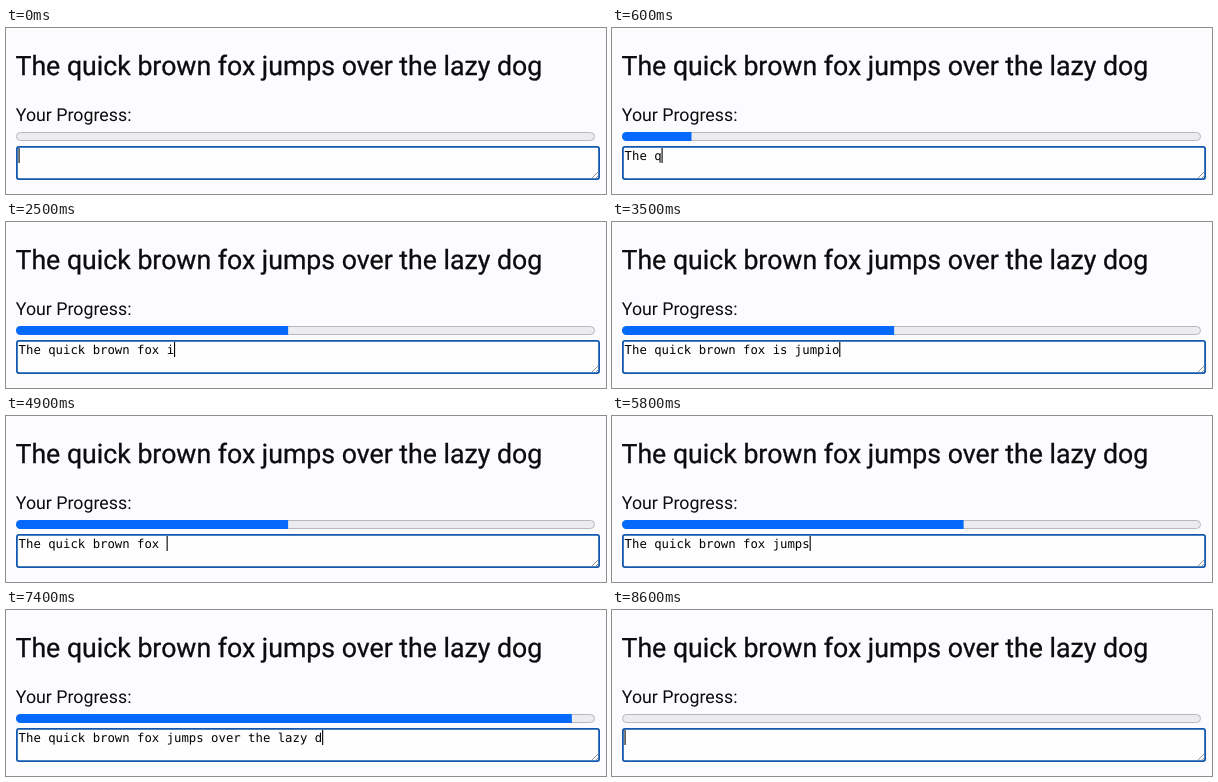
Write an HTML page that moves like this. It is 600 px wide and 166 px high and loops after 8700 ms.

```html
<!DOCTYPE html>
<html lang="en">
<head>
<meta charset="utf-8">
<title>Typing test</title>
<style>
  html, body { margin: 0; width: 100%; height: 100%; overflow: hidden; background: #fcfbfd; }
  svg { display: block; width: 600px; height: 166px; }
  text { font-family: Roboto, sans-serif; fill: #0c0c0e; white-space: pre; text-rendering: geometricPrecision; }
  .title { font-size: 26.7px; stroke: #0c0c0e; stroke-width: .3px; }
  .label { font-size: 17.8px; }
  #typed { font-family: "DejaVu Sans Mono", monospace; font-size: 12.3px; fill: #000; }
  .track { fill: #ececee; stroke: #b9b9bb; }
  #value { fill: #056afb; }
  .field { fill: #fefefe; stroke: #1259ae; stroke-width: 1.8px; }
  .grip { stroke: #8a8a8a; stroke-width: .9px; }
</style>
</head>
<body>
<svg viewBox="0 0 600 166">
  <clipPath id="pill"><rect x="10" y="104" width="579" height="9" rx="4.5"/></clipPath>
  <text class="title" x="9.5" y="47">The quick brown fox jumps over the lazy dog</text>
  <text class="label" x="9.8" y="93">Your Progress:</text>
  <rect class="track" x="10.5" y="104.5" width="578" height="8" rx="4"/>
  <rect id="value" x="10" y="104" width="0" height="9" clip-path="url(#pill)"/>
  <rect class="field" x="10.9" y="118.9" width="582.2" height="32.2" rx="2"/>
  <path class="grip" d="M586 150l6.5-6.5M590 150l2.5-2.5"/>
  <text id="typed" x="12.6" y="132"></text>
  <rect id="caret" x="12.5" y="120" width="1.1" height="15"/>
</svg>
<script>
  const GOAL = 'The quick brown fox jumps over the lazy dog';
  const LOOP = 8700, BEAT = 100, BLINK = 500, ADVANCE = 7.405;
  const $ = id => document.getElementById(id);
  const typed = $('typed'), value = $('value'), caret = $('caret');

  // Each state holds the text from its time on; only typing restarts the caret blink.
  const states = [{ time: 0, text: '', key: -100 }];
  const last = () => states[states.length - 1];

  function type(time, keys) {
    keys.split('|').forEach((chars, i) => {
      const at = time + i * BEAT;
      if (chars) states.push({ time: at, text: last().text + chars, key: at });
    });
  }

  function erase(time, count) {
    const { text, key } = last();
    states.push({ time, text: text.slice(0, -count), key });
  }

  type(100, 'T|h|e| ');
  type(600, 'q|u|i|c|k ');
  type(1200, 'br|o|wn| ');
  type(1700, 'f|o');
  type(2000, 'x');
  type(2400, ' |i|s|| ');
  type(3000, 'j|u|m|p|i|o');
  erase(4200, 6);
  erase(4900, 3);
  type(5200, 'j|u|m');
  type(5600, 'p|s|| |o|v|e|r| ');
  type(6600, 't|h|e| |l|a|z|y |d|og');
  states.push({ time: 8600, text: '', key: 8600 });

  function progress(text) {
    let n = 0;
    while (n < text.length && text[n] === GOAL[n]) n++;
    return Math.ceil(100 * n / GOAL.length) / 100;
  }

  function draw() {
    const t = performance.now() % LOOP;
    const { text, key } = states.filter(s => s.time <= t).pop();
    const on = Math.floor((t - key) / BLINK) % 2 === 0;
    typed.textContent = text;
    value.setAttribute('width', 579 * progress(text));
    caret.setAttribute('x', 12.5 + ADVANCE * text.length);
    caret.setAttribute('visibility', on ? 'visible' : 'hidden');
    requestAnimationFrame(draw);
  }
  draw();
</script>
</body>
</html>
```
